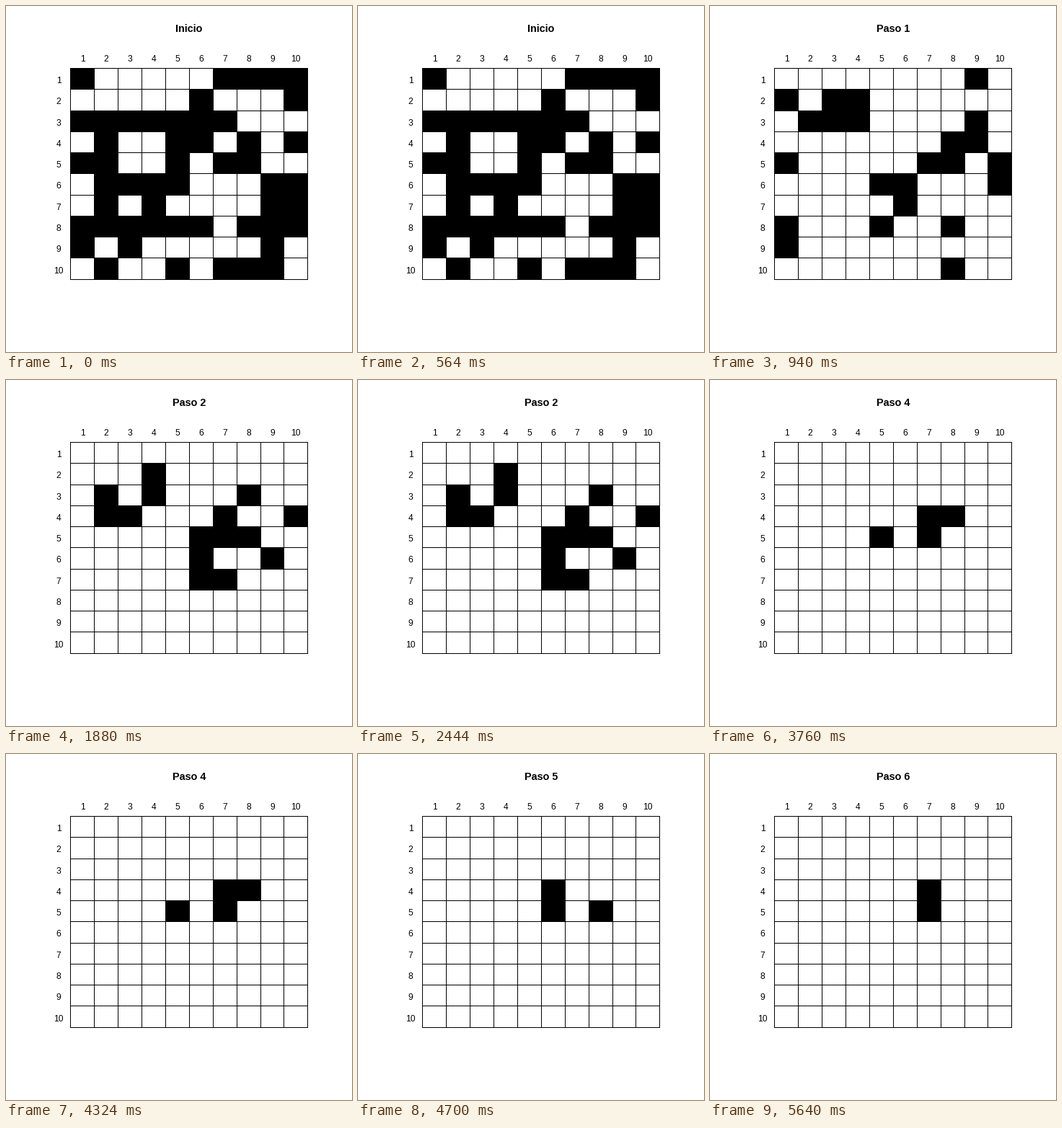
Animation, 480 px wide and 480 px high, one loop 6.58 s. Source, as a matplotlib script:

```python
import numpy as np
import matplotlib.pyplot as plt
from matplotlib.animation import FuncAnimation
from matplotlib.patches import Rectangle

SIZE, DPI = 480, 96
PT = 72 / DPI  # points per pixel
N = 10
STEPS = 7
STEP_MS = 940

START = """
1000001111
0000010001
1111111000
0100110101
1100101100
0111100011
0101000011
1111110111
1010000010
0100101110
""".split()

# Pixel positions of the grid lines
XS = np.round(89.35 + 32.9 * np.arange(N + 1)).astype(int)
YS = np.floor(86.45 + 29.28 * np.arange(N + 1)).astype(int)


def evolve(grid):
    """A cell is alive next if it has exactly three live neighbours."""
    p = np.pad(grid, 1)
    total = sum(p[r:r + N, c:c + N] for r in range(3) for c in range(3))
    return (total - grid == 3).astype(int)


grids = [np.array([[int(ch) for ch in row] for row in START])]
for _ in range(STEPS - 1):
    grids.append(evolve(grids[-1]))

plt.rcParams["font.family"] = "Liberation Sans"
fig = plt.figure(figsize=(SIZE / DPI, SIZE / DPI), dpi=DPI, facecolor="white")
ax = fig.add_axes([0, 0, 1, 1])
ax.set_xlim(0, SIZE)
ax.set_ylim(SIZE, 0)
ax.axis("off")


def box(x, y, w, h):
    return ax.add_patch(Rectangle((x, y), w, h, fc="black", lw=0,
                                  antialiased=False))


def label(x, y, text, size=12, **style):
    return ax.text(x, y, text, fontsize=size * PT, color="black",
                   ha="center", va="baseline", **style)


for x in XS:
    box(x, YS[0], 1, YS[-1] - YS[0] + 1)
for y in YS:
    box(XS[0], y, XS[-1] - XS[0] + 1, 1)

for k in range(N):
    label((XS[k] + XS[k + 1] + 1) / 2, 77, str(k + 1))
    label(73, round(107 + 29.28 * k), str(k + 1))

cells = [[box(XS[c], YS[r], XS[c + 1] - XS[c], YS[r + 1] - YS[r])
          for c in range(N)] for r in range(N)]
title = label(254, 36, "", 14.4, weight="bold")


def draw(step):
    title.set_text(f"Paso {step}" if step else "Inicio")
    for row, states in zip(cells, grids[step]):
        for cell, alive in zip(row, states):
            cell.set_visible(bool(alive))
    return []


anim = FuncAnimation(fig, draw, frames=STEPS, interval=STEP_MS,
                     repeat=True, repeat_delay=0, blit=False)
plt.show()
```
